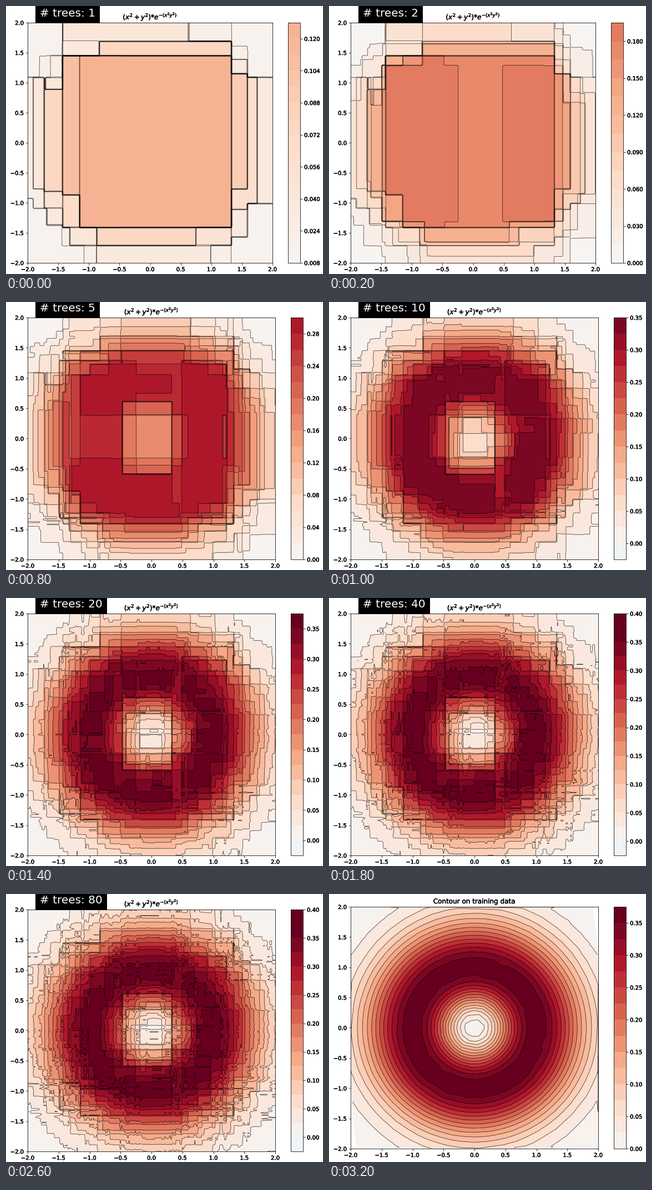
Animation, 571 px wide and 482 px high, one loop 3.8 s. Source, as a matplotlib script:

```python
import numpy as np
import matplotlib.pyplot as plt
from matplotlib.animation import FuncAnimation
from matplotlib.patheffects import withStroke

W, H, DPI = 571, 482, 72
RATE, DEPTH, SHRINK = 0.44, 6, 1
SAMPLES = 2500
VMAX = 0.36
TREES = [*range(1, 6), *range(10, 21, 5), *range(30, 81, 10)]
BOLD = [withStroke(linewidth=0.5, foreground="k")]

plt.rcParams["font.family"] = "DejaVu Sans"


def hill(x, y):
    r2 = x**2 + y**2
    return r2 * np.exp(-r2)


def grow(pts, res, fit, cells, depth, out):
    """Fit one greedy regression tree and write its leaf values into out."""
    n = len(fit)
    if depth == 0 or n < 2:
        out[cells] = res[fit].sum() / (n + SHRINK)
        return
    best = None
    left = np.arange(1, n)
    for axis in (0, 1):
        order = fit[np.argsort(pts[axis, fit])]
        s = np.cumsum(res[order])
        gain = (s[:-1]**2 / (left + SHRINK)
                + (s[-1] - s[:-1])**2 / (n - left + SHRINK))
        k = np.argmax(gain)
        if best is None or gain[k] > best[0]:
            best = gain[k], axis, order, k
    _, axis, order, k = best
    cut = pts[axis, order[k:k + 2]].mean()
    low = pts[axis, cells] <= cut
    grow(pts, res, order[:k + 1], cells[low], depth - 1, out)
    grow(pts, res, order[k + 1:], cells[~low], depth - 1, out)


def boost(train, line):
    """Gradient boosting; returns the predicted grid after each shown count."""
    gx, gy = np.meshgrid(line, line)
    pts = np.hstack([train, np.array([gx.ravel(), gy.ravel()])])
    target = hill(*train)
    fit, everything = np.arange(SAMPLES), np.arange(pts.shape[1])
    pred = np.zeros(pts.shape[1])
    step = np.zeros_like(pred)
    fields = {}
    for tree in range(1, TREES[-1] + 1):
        grow(pts, target - pred[:SAMPLES], fit, everything, DEPTH, step)
        pred += RATE * step
        if tree in TREES:
            fields[tree] = pred[SAMPLES:].reshape(gx.shape).copy()
    return fields


TRAIN = np.random.default_rng(11).uniform(-2, 2, (2, SAMPLES))
LINE = np.linspace(-2, 2, 201)
FIELDS = boost(TRAIN, LINE)


def level_range(trees):
    """Lowest level, highest level and step of the colour scale."""
    if trees == 1:
        return 0.008, 0.128, 0.008
    if trees == 2:
        return 0, 0.195, 0.015
    if trees < 10:
        return 0, 0.2 + 0.02 * trees, 0.02
    return -0.025, 0.35 + 0.025 * ((trees > 10) + (trees > 20)), 0.025


def panel(x0, x1, y0, y1):
    """Axes from pixel edges measured from the top left."""
    return fig.add_axes([x0 / W, 1 - y1 / H, (x1 - x0) / W, (y1 - y0) / H])


def plot(x, y, z, scale, right, top, bottom, title):
    lo, hi, step = scale
    levels = lo + step * np.arange(round((hi - lo) / step) + 1)
    z = np.clip(z, levels[0] + 1e-4, levels[-1] - 1e-4)
    ax = panel(39, right, top, bottom)
    bar = panel(right + 28, right + 50, top, bottom)

    scattered = z.ndim == 1
    paint, trace = ((ax.tricontourf, ax.tricontour) if scattered
                    else (ax.contourf, ax.contour))
    fill = paint(x, y, z, levels, cmap="RdBu_r", vmin=-VMAX, vmax=VMAX)
    trace(x, y, z, levels, colors="k", linewidths=0.7, linestyles="solid",
          alpha=0.8)
    ticks = np.arange(-2, 2.1, 0.5)
    ax.set(xlim=(-2, 2), ylim=(-2, 2), xticks=ticks, yticks=ticks)
    heading = ax.set_title(title, fontsize=12)

    cbar = fig.colorbar(fill, cax=bar)
    marks = levels[(1 if lo < 0 else 0)::2]
    digits = 3 if step < 0.02 else 2
    cbar.set_ticks(marks, labels=[f"{m:.{digits}f}" for m in marks])
    cbar.minorticks_off()

    labels = ax.get_xticklabels() + ax.get_yticklabels() + bar.get_yticklabels()
    for text in labels + [heading]:
        text.set_path_effects(BOLD)
    return ax


def update(i):
    fig.clear()
    if i >= 16:
        plot(*TRAIN, hill(*TRAIN), (0, 0.375, 0.025), 485, 23, 458,
             "Contour on training data")
        return []
    trees = TREES[min(i, len(TREES) - 1)]
    edges = (480, 30, 462) if trees < 3 else (485, 28, 463)
    ax = plot(LINE, LINE, FIELDS[trees], level_range(trees), *edges,
              "$(x^2+y^2)$*$e^{-(x^2y^2)}$")
    ax.text(-1.8, 2.1, f"# trees: {trees}", fontsize=20, color="white",
            bbox=dict(facecolor="black", linewidth=0, pad=8))
    return []


fig = plt.figure(figsize=((W + 0.001) / DPI, (H + 0.001) / DPI), dpi=DPI,
                 facecolor="white")
anim = FuncAnimation(fig, update, frames=19, interval=200, repeat=True,
                     repeat_delay=0, blit=False)
plt.show()
```
